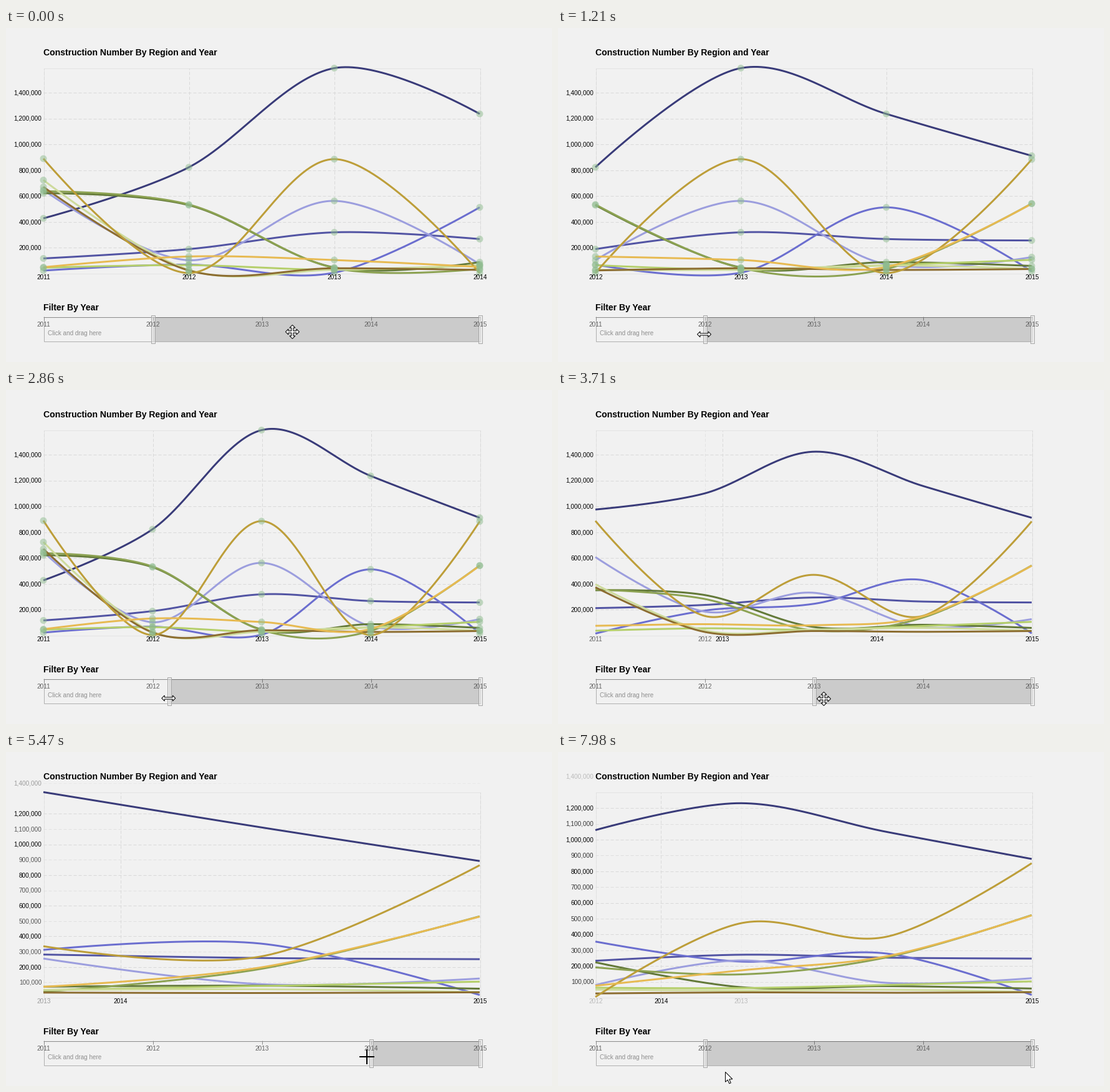
Recreate the animation shown at these times as a matplotlib script. Size 876x537 px, loop 8 s.

```python
import numpy as np
import matplotlib.pyplot as plt
from matplotlib.animation import FuncAnimation
from matplotlib.patches import Circle, Polygon, Rectangle

W, H, DPI = 876, 537, 100
LOOP, INTERVAL = 8000, 40
LEFT, RIGHT, TOP, BOTTOM = 60, 760, 64.5, 395
DURATION = 1000
PX = 72 / DPI

plt.rcParams["font.family"] = "Liberation Sans"

# Colour and yearly values in thousands, 2011 to 2015
SERIES = [
    ("#393b79", (428, 823, 1590, 1236, 912)),
    ("#5254a3", (118, 190, 320, 268, 257)),
    ("#6b6ecf", (24, 70, 8, 513, 18)),
    ("#9c9ede", (648, 104, 563, 73, 128)),
    ("#637939", (622, 530, 48, 89, 60)),
    ("#8ca252", (638, 535, 44, 37, 543)),
    ("#b5cf6b", (46, 66, 30, 65, 107)),
    ("#cedb9c", (724, 30, 31, 64, 38)),
    ("#8c6d31", (671, 25, 42, 29, 36)),
    ("#bd9e39", (890, 5, 886, 5, 884)),
    ("#e7ba52", (50, 133, 106, 52, 541)),
]

# Start of each transition and the first and last year it leads to
TRANSITIONS = [(90, 2012, 2015), (1688, 2011, 2015), (3230, 2013, 2015),
               (4915, 2014, 2015), (7597, 2012, 2015)]

REFRESH = [(120, 1060, 8), (1210, 2170, 8), (2300, 3130, 7), (3430, 4380, 8),
           (4530, 5470, 8), (5620, 6210, 5), (6770, 6910, 2), (7310, 7980, 6)]
STEPS = np.concatenate([[0]] + [np.linspace(*group) for group in REFRESH])

# Left edge of the brush: (time, x)
BRUSH = [(0, 235), (1250, 235), (1640, 60), (2480, 60), (3130, 410),
         (4480, 410), (4880, 585), (7000, 585), (7310, 494), (7560, 235)]

# Cursor path: (time, x, y, shape from here on)
POINTER = [(0, 459.5, 488.5, "move"), (120, 459.5, 488.5, "move"),
           (1060, 250, 492, "move"), (1190, 234.5, 492.5, "resize"),
           (1250, 234.5, 492.5, "resize"), (1640, 59.5, 494, "resize"),
           (2020, 61, 494, "move"), (2170, 65.5, 494.5, "move"),
           (2420, 59.5, 495, "resize"), (2480, 59.5, 495, "resize"),
           (3130, 410, 496, "resize"), (3500, 412, 496, "move"),
           (3701, 426.5, 496.5, "move"), (4000, 426.5, 496.5, "move"),
           (4360, 410, 494, "resize"), (4480, 410, 494, "resize"),
           (4880, 585, 491, "resize"), (5200, 580, 490, "cross"),
           (5470, 579, 490, "cross"), (6210, 581, 490, "cross"),
           (6700, 583, 490, "resize"), (6910, 585, 490, "resize"),
           (7310, 443.5, 495.5, "resize"), (7560, 235, 497, "resize"),
           (7680, 240, 503, "resize"), (7700, 242, 506, "arrow"),
           (7980, 268.5, 514.5, "arrow")]

PLOT_X = np.linspace(LEFT, RIGHT, 351)


def cardinal(xs, ys):
    """Heights of a cardinal spline through the points, along PLOT_X."""
    p = np.column_stack([xs, ys])
    if len(p) < 3:
        return np.interp(PLOT_X, xs, ys)
    handles = np.zeros_like(p)
    handles[1:-1] = (p[2:] - p[:-2]) / 6
    s = np.linspace(0, 1, 80)[:, None]
    curve = np.vstack([
        a * (1 - s)**3 + 3 * (a + ha) * s * (1 - s)**2
        + 3 * (b - hb) * s**2 * (1 - s) + b * s**3
        for a, b, ha, hb in zip(p, p[1:], handles, handles[1:])])
    return np.interp(PLOT_X, *curve.T)


class View:
    """A resting state of the chart for a span of years."""

    def __init__(self, first, last):
        self.years = list(range(first, last + 1))
        self.xs = np.linspace(LEFT, RIGHT, len(self.years))
        rows = [[vals[y - 2011] for y in self.years] for _, vals in SERIES]
        self.top = max(map(max, rows))
        step = 200 if self.top > 1300 else 100
        self.ticks = list(range(step, self.top, step))
        self.knots = [self.y(np.array(row)) for row in rows]
        self.curves = [cardinal(self.xs, ys) for ys in self.knots]

    def y(self, value):
        return BOTTOM - (BOTTOM - TOP) * value / self.top

    def x(self, year):
        return self.xs[self.years.index(year)] if year in self.years else None


def ease(u):
    return 4 * u**3 if u < 0.5 else 1 - 4 * (1 - u)**3


def mix(a, b, k):
    return a + (b - a) * k


fig = plt.figure(figsize=(W / DPI, H / DPI), dpi=DPI, facecolor="#f1f1f1")
ax = fig.add_axes([0, 0, 1, 1])
ax.set_xlim(0, W)
ax.set_ylim(H, 0)
ax.axis("off")
live = []


def text(x, y, s, size=10, color="black", **kw):
    return ax.text(x, y, s, fontsize=size * PX, color=color, va="baseline", **kw)


def stroke(xs, ys, color, width=1, **kw):
    line, = ax.plot(xs, ys, color=color, lw=width * PX,
                    solid_capstyle="butt", **kw)
    return line


def box(x, y, w, h, fill, edge="none", **kw):
    return ax.add_patch(Rectangle((x, y), w, h, fc=fill, ec=edge, lw=PX, **kw))


def grid_line(xs, ys, alpha):
    live.append(stroke(xs, ys, "#d9d9d9", alpha=alpha, zorder=1,
                       dashes=(5, 3), dash_capstyle="butt"))


def draw_static():
    text(LEFT, 44, "Construction Number By Region and Year", 14, weight="bold")
    text(LEFT, 454, "Filter By Year", 14, weight="bold")
    box(60.5, TOP, 700, BOTTOM - TOP, "none", "#e3e3e3", zorder=0.5)
    box(60.5, 464.5, 700, 39.5, "none", "#b0b0b0", zorder=4)
    stroke([60, 761], [464.5, 464.5], "#8a8a8a", zorder=4.1)
    for i in range(5):
        x = LEFT + 175 * i
        stroke([x + .5, x + .5], [464, 470], "#8a8a8a", zorder=4.1)
        text(x + .5, 479.5, str(2011 + i), color="#606060", ha="center",
             zorder=7)
    text(67, 494.5, "Click and drag here", color="#909090", zorder=4.2)


def draw_axes(old, new, k):
    for year in sorted(set(old.years + new.years)):
        a, b = old.x(year), new.x(year)
        alpha = 1 if None not in (a, b) else k if a is None else 1 - k
        if alpha < 0.01:
            continue
        x = mix(b if a is None else a, a if b is None else b, k)
        grid_line([x + .5] * 2, [BOTTOM, TOP], alpha)
        live.append(text(x + .5, 404, str(year), ha="center", alpha=alpha,
                         zorder=3.5))
    for tick in sorted(set(old.ticks + new.ticks)):
        alpha = mix(tick in old.ticks, tick in new.ticks, k)
        if alpha < 0.01:
            continue
        y = mix(old.y(tick), new.y(tick), k)
        grid_line([LEFT, RIGHT], [y, y], alpha)
        live.append(text(57.3, y + 3.3, f"{tick * 1000:,}", ha="right",
                         alpha=alpha, zorder=3.5))


def draw_lines(old, new, u):
    for (color, _), a, b in zip(SERIES, old.curves, new.curves):
        live.append(stroke(PLOT_X, mix(a, b, u), color, 3, zorder=2))
    if u < 1:
        return
    for ys in new.knots:
        for spot in zip(new.xs, ys):
            live.append(ax.add_patch(Circle(spot, 5.5, fc="#8fbc8f", ec="none",
                                            alpha=.5, zorder=3)))


def draw_brush(x):
    live.append(box(x, 464.5, RIGHT - x, 39.5, (0, 0, 0, .155), zorder=5))
    for hx in (x, RIGHT):
        live.append(box(hx - 2.5, 461.5, 6, 45.5, (.93, .93, .93, .5),
                        "#a8a8a8", zorder=6))


def spin(arm, turns):
    """Repeat one arm of a cursor around its centre."""
    angles = [2 * np.pi * i / turns for i in range(turns)]
    return [(x * np.cos(a) - y * np.sin(a), x * np.sin(a) + y * np.cos(a))
            for a in angles for x, y in arm]


HEAD = [(6.5, -1.5), (6.5, -4.5), (11, 0), (6.5, 4.5), (6.5, 1.5)]
SHAPES = {
    "move": spin([(1.5, -1.5)] + HEAD, 4),
    "resize": spin(HEAD, 2),
    "cross": spin([(1, -1), (12, -1), (12, 1)], 4),
    "arrow": [(0, 0), (0, 16), (3.7, 12.6), (6.3, 18.5), (8.8, 17.5),
              (6.3, 11.6), (11.4, 11.4)],
}


def draw_pointer(t):
    times, xs, ys, kinds = zip(*POINTER)
    kind = kinds[np.searchsorted(times, t, side="right") - 1]
    spot = np.array([np.interp(t, times, xs), np.interp(t, times, ys)])
    solid = kind == "cross"
    live.append(ax.add_patch(Polygon(
        np.array(SHAPES[kind]) + spot, fc="black" if solid else "white",
        ec="none" if solid else "black", lw=PX, zorder=9)))


VIEWS = [View(2011, 2014)] + [View(a, b) for _, a, b in TRANSITIONS]


def update(frame):
    while live:
        live.pop().remove()
    now = frame * INTERVAL + 30.5
    t = STEPS[STEPS <= now][-1]
    stage = sum(start <= t for start, _, _ in TRANSITIONS)
    new = VIEWS[stage]
    old = VIEWS[max(stage - 1, 0)]
    u = min((t - TRANSITIONS[stage - 1][0]) / DURATION, 1) if stage else 1
    draw_axes(old, new, ease(u))
    draw_lines(old, new, u)
    draw_brush(np.interp(t, *zip(*BRUSH)))
    draw_pointer(t)
    return live


draw_static()
anim = FuncAnimation(fig, update, frames=LOOP // INTERVAL, interval=INTERVAL,
                     init_func=lambda: [], repeat=True, repeat_delay=0)
plt.show()
```
